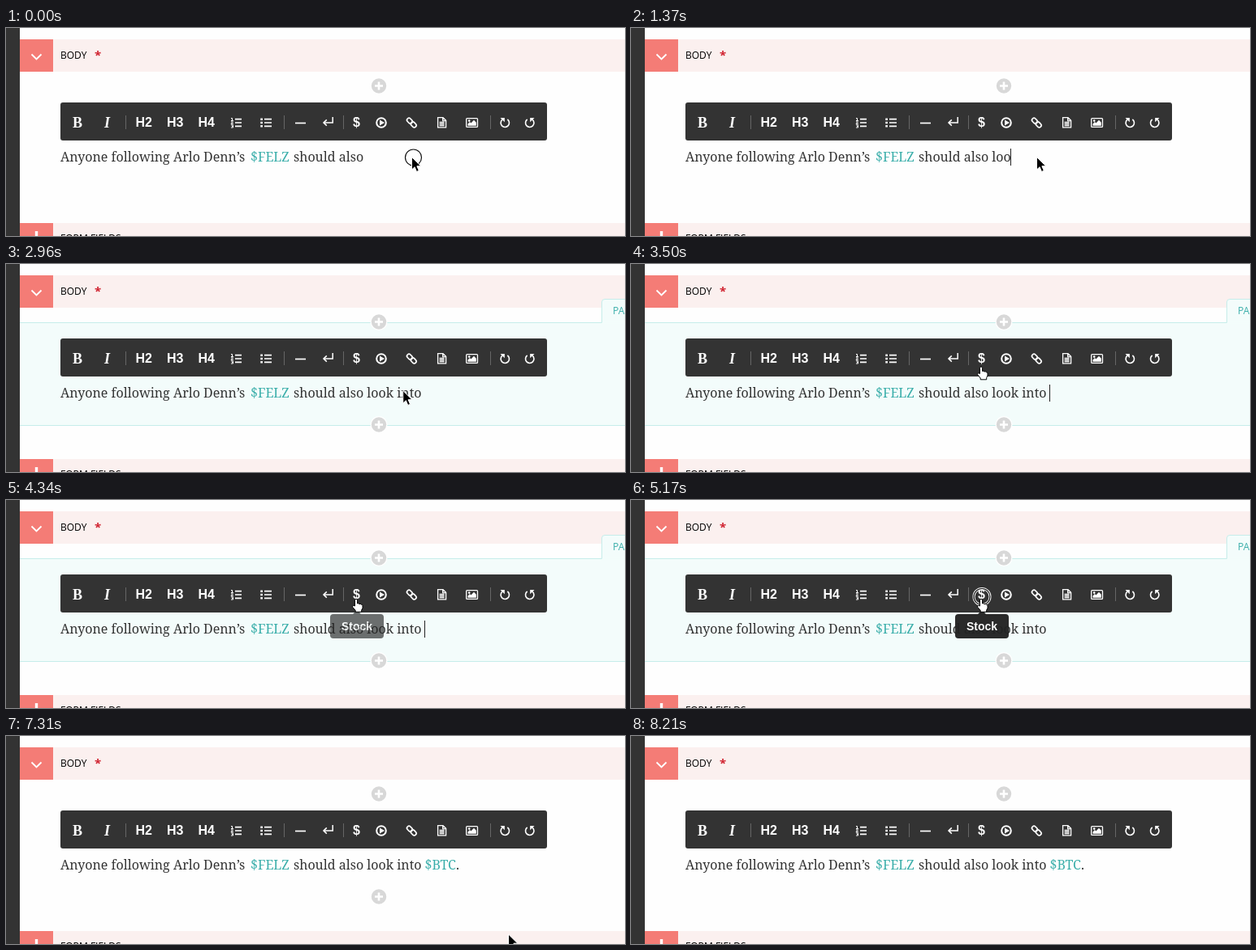
These frames come from a looping animation (762 by 257 pixels, 8.31 s). An HTML page:

```html
<!DOCTYPE html>
<html lang="en">
<head>
<meta charset="utf-8">
<title>Editor: inserting a stock link</title>
<style>
  html, body { margin: 0; width: 100%; height: 100%; overflow: hidden; background: #fefefe; }
  svg { display: block; width: 762px; height: 257px; }
  text { white-space: pre; }
  .label { font: 12px "Open Sans", sans-serif; }
  .copy { font: 16px "Noto Serif", serif; fill: #333; }
  .teal { fill: #3aaeaa; }
  .bar text { font: bold 16px "Liberation Sans", Arial, sans-serif; fill: #fff; }
  .bar .serif { font: bold 18px "Liberation Serif", serif; }
  .bar .italic { font-style: italic; }
  .icon { fill: none; stroke: #fff; stroke-width: 1.7; }
  .solid { fill: #fff; stroke: none; }
</style>
</head>
<body>
<svg viewBox="0 0 762 257">
  <defs>
    <g id="plus">
      <circle r="10.5" fill="#fff"/>
      <circle r="9.2" fill="#d8d8d8"/>
      <path d="M-5 0H5M0-5V5" stroke="#fff" stroke-width="2.6"/>
    </g>
  </defs>

  <path fill="#333" d="M0 0H17V257H0z"/>
  <path fill="#fbf0ef" d="M58 14H762V54H58zM58 241H762V257H58z"/>
  <path fill="#f47c76" d="M17 14H58V54H17zM17 241H58V257H17z"/>
  <path fill="none" stroke="#fff" stroke-width="1.8" d="M31.5 32.5L37.5 38.5L43.5 32.5"/>
  <path stroke="#fff" stroke-width="3.4" d="M37.5 251V257"/>
  <text class="label" x="67" y="38">BODY</text>
  <text class="label" x="109" y="39" fill="#d0202e" font-size="15" style="font-size:15px;font-weight:bold">*</text>
  <text class="label" x="67" y="263.5">FORM FIELDS</text>

  <g id="active">
    <path fill="#f3fcfb" d="M17 72H762V200H17z"/>
    <path fill="none" stroke="#c6edea" d="M17 199.5H762M17 72.5H733.5"/>
    <path fill="#f3fcfb" stroke="#c6edea" d="M733.5 72.5V47Q733.5 43.5 737 43.5H764V72.5"/>
    <path stroke="#f3fcfb" stroke-width="2" d="M734 72.5H762"/>
    <text class="label teal" x="747" y="62">PARAGRAPH</text>
  </g>
  <use href="#plus" x="459" y="71.5"/>
  <use href="#plus" id="lowerPlus" x="459" y="198.5"/>

  <g class="bar">
    <rect x="67" y="92" width="599" height="47" rx="3" fill="#333"/>
    <path stroke="#666" d="M147.5 108V125M342.5 108V125M415.5 108V125M596.5 108V125"/>
    <text class="serif" x="82" y="122.5">B</text>
    <text class="serif italic" x="121" y="122.5">I</text>
    <text x="159.5" y="122">H2</text>
    <text x="198" y="122">H3</text>
    <text x="236.5" y="122">H4</text>
    <text x="427" y="122">$</text>
    <g class="icon">
      <path d="M282 112.7H290M282 117H290M282 121.3H290M318 112.7H327M318 117H327M318 121.3H327"/>
      <path stroke-width="1" d="M277 111.5H278.5V114.5M277 114.5H280M277 116H279.5L277 118.5H280M277 120H279.5V123H277M279.5 121.5H278"/>
      <path class="solid" d="M313.3 111.5h2.6v2.4h-2.6zM313.3 115.8h2.6v2.4h-2.6zM313.3 120.1h2.6v2.4h-2.6z"/>
      <path d="M356 117.5H369"/>
      <path d="M402.2 110V117H392M394.8 113.4L391 117L394.8 120.6" stroke-width="1.5"/>
      <circle cx="462" cy="117" r="5.8" stroke-width="2"/>
      <path class="solid" d="M460 113.6L466 117L460 120.4z"/>
      <g transform="rotate(45 499.3 117)">
        <rect x="492.3" y="114.5" width="7.4" height="5" rx="2.4"/>
        <rect x="499" y="114.5" width="7.4" height="5" rx="2.4"/>
      </g>
      <path stroke-width="1.3" d="M531.6 110.7H538L541.6 114.3V122.9H531.6zM537.7 110.7V114.6H541.6M533.6 116.5H539.6M533.6 118.5H539.6M533.6 120.5H539.6"/>
      <rect x="566.7" y="111.6" width="13.8" height="10.8" rx="1" stroke-width="1.3"/>
      <path class="solid" d="M568.5 120.8V118.5L571 116L572.4 117.4L576 113.8L578.8 116.8V120.8z"/>
      <circle class="solid" cx="570.2" cy="114.6" r="1.3"/>
      <g id="undo">
        <path stroke-width="1.6" d="M611 113.2A5.2 5.2 0 1 0 617.3 113"/>
        <path class="solid" d="M608.5 111H613.8V116.2z"/>
      </g>
      <use href="#undo" transform="matrix(-1 0 0 1 1259 0)"/>
    </g>
  </g>

  <text class="copy" y="165"><tspan x="67">Anyone following Arlo Denn’s</tspan><tspan class="teal" x="301">$FELZ</tspan></text>
  <text class="copy" id="typed" x="354" y="165"></text>
  <text class="copy teal" id="ticker" x="515.5" y="165">$BTC</text>
  <text class="copy" id="stop" x="554" y="165">.</text>
  <path id="caret" stroke="#222" d="M.5 149V170"/>

  <g id="tip">
    <path fill="#222" d="M426 142L432 136L438 142z"/>
    <rect x="399" y="141" width="66" height="30" rx="4" fill="#222"/>
    <text x="432" y="161" text-anchor="middle" fill="#fff" style="font:bold 14px 'Liberation Sans',Arial,sans-serif">Stock</text>
  </g>

  <g id="ring" fill="none">
    <circle r="10" stroke="#fff" stroke-width="3"/>
    <circle r="10" stroke="#111" stroke-width="1.2"/>
  </g>
  <g id="mouse" stroke-linejoin="round">
    <path id="arrow" fill="#000" stroke="#fff" d="M0 0V15.5L3.6 12.2L6 18L8.8 16.8L6.4 11.2H11.3z"/>
    <path id="hand" fill="#fff" stroke="#000" d="M-1.6 9V1.8Q-1.5.4 0 .4T1.6 1.8V6Q2.8 5 4 6.6Q5.4 5.6 6.3 7.2Q8 6.7 8 8.6V11.5L6.7 14V16.3H-.8V14.5L-4.4 10.2Q-4.8 8.3-3.2 8.3z"/>
  </g>
</svg>
<script>
const LOOP = 8310;
const $ = id => document.getElementById(id);
const between = (t, a, b) => t >= a && t < b;
const show = (id, on) => $(id).style.display = on ? "" : "none";
const place = (id, x, y) => $(id).setAttribute("transform", `translate(${x} ${y})`);

const before = "should also ", added = "look into ";
const keyTimes = [950, 1190, 1370, 1455, 1540, 1720, 1840, 2010, 2130, 2310];
const caretOn = [[410, 2790], [3320, 3800], [4280, 4750], [5290, 5830], [6300, 7200], [7730, 8210]];

// time, x, y of the pointer's hot spot
const path = [
  [0, 499.5, 159.5], [2790, 499.5, 159.5], [3100, 480, 154], [3400, 436, 133],
  [3500, 431, 126.5], [3790, 431, 126.5], [3860, 431, 122], [6120, 431, 122],
  [6200, 431.5, 121.5], [6300, 431, 122], [7190, 431, 122], [7310, 618.5, 245], [LOOP, 618.5, 245]
];

function pointer(t) {
  const i = path.findIndex(p => p[0] > t);
  const [t0, x0, y0] = path[i - 1], [t1, x1, y1] = path[i];
  const k = (t - t0) / (t1 - t0);
  return [x0 + (x1 - x0) * k, y0 + (y1 - y0) * k];
}

function tipOpacity(t) {
  if (t < 4280 || t >= 5290) return 0;
  return 0.96 * Math.min(1, (t - 4220) / 180, (5290 - t) / 60);
}

function draw(t) {
  const active = between(t, 2800, 7300);
  show("active", active);
  show("lowerPlus", active || between(t, 7300, 7370));

  const typed = $("typed");
  typed.textContent = before + added.slice(0, keyTimes.filter(k => t >= k).length);
  show("ticker", t >= 5260);
  show("stop", t >= 6720);
  const caretX = t >= 6720 ? 558 : t >= 5260 ? 554 : 354 + typed.getComputedTextLength();
  place("caret", Math.min(558, Math.floor(caretX)), 0);
  show("caret", caretOn.some(([a, b]) => between(t, a, b)));

  $("tip").style.opacity = tipOpacity(t);

  const [x, y] = pointer(t), hand = x < 445 && y < 139;
  place("mouse", x, y);
  show("mouse", t < 7370);
  show("hand", hand);
  show("arrow", !hand);
  show("ring", t < 60 || between(t, 5170, 5230));
  place("ring", t < 60 ? 501.5 : 432, t < 60 ? 160 : 119.5);
}

const start = performance.now();
function tick() {
  draw((performance.now() - start) % LOOP);
  requestAnimationFrame(tick);
}
tick();
</script>
</body>
</html>
```
